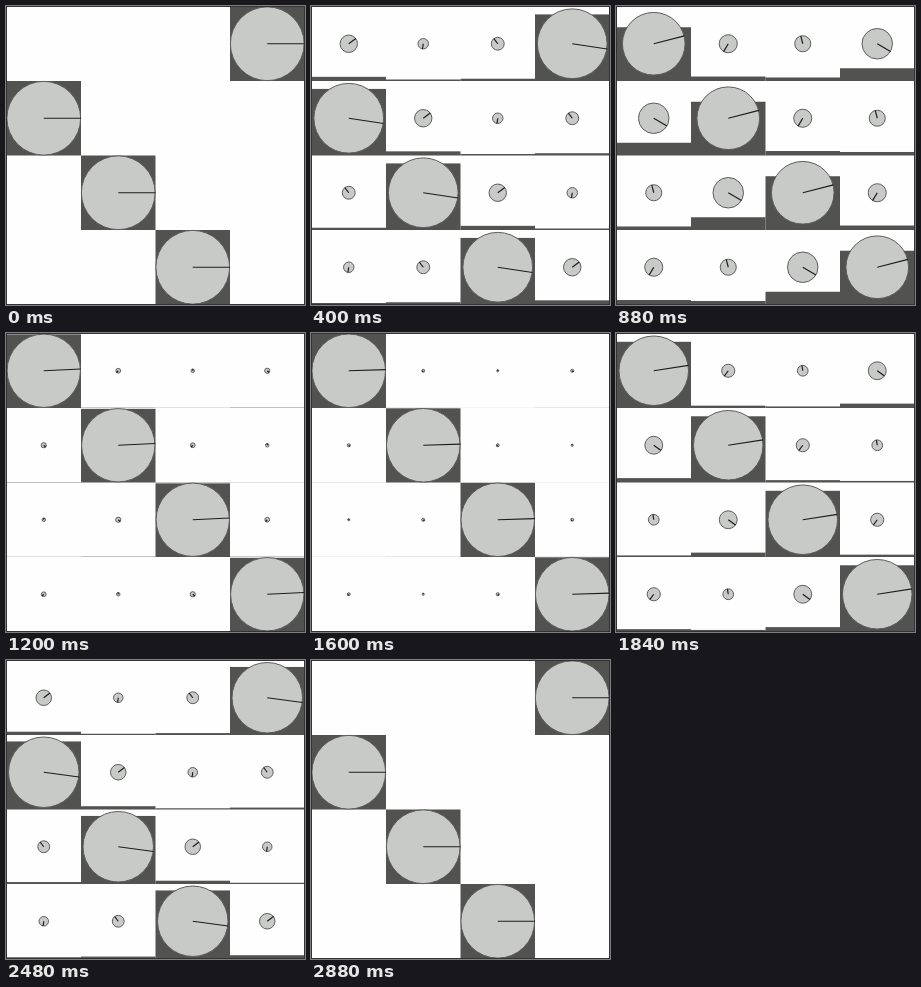
Recreate the animation shown at these times as an HTML page with a canvas. Size 299 by 299 pixels, loop 2.96 s.

```html
<!DOCTYPE html>
<html lang="en">
<head>
<meta charset="utf-8">
<title>Fractional cyclic shift</title>
<style>
  html, body { margin: 0; width: 100%; height: 100%; overflow: hidden; background: #fefefe; }
  canvas { display: block; width: 299px; height: 299px; }
</style>
</head>
<body>
<canvas id="stage" width="299" height="299"></canvas>
<script>
const ctx = document.getElementById('stage').getContext('2d');
const SIZE = 299, CELL = 74.5, EDGE = 0.5;
const STEP = 80, STEPS = 37;

// Phase of the swing in degrees at given steps, linear in between.
const SWING = [[0, 0], [8, 82.6], [11, 111.2], [15, 151.5], [23, 232.3], [28, 280.8], [36, 362]];

function swingAt(step) {
  const i = SWING.findIndex(([at]) => at >= step);
  if (i === 0) return 0;
  const [a, from] = SWING[i - 1], [b, to] = SWING[i];
  return (from + (to - from) * (step - a) / (b - a)) * Math.PI / 180;
}

// Entry of the 4x4 cyclic shift raised to power s, on diagonal k.
function amplitude(k, s) {
  const sign = k % 2 ? -1 : 1;
  return {
    re: (1 + 2 * Math.cos(Math.PI / 2 * (s - k)) + sign * Math.cos(Math.PI * s)) / 4,
    im: sign * Math.sin(Math.PI * s) / 4
  };
}

function drawCell(row, col, { re, im }) {
  const mag = Math.hypot(re, im);
  if (mag < 1e-6) return;
  const x = EDGE + col * CELL, y = EDGE + row * CELL;
  const cx = x + CELL / 2, cy = y + CELL / 2, reach = CELL / 2;

  const height = CELL * mag * mag;
  ctx.fillStyle = '#525250';
  ctx.fillRect(x, y + CELL - height, CELL, height);

  ctx.beginPath();
  ctx.arc(cx, cy, reach * mag * 0.99, 0, 2 * Math.PI);
  ctx.fillStyle = '#c8cac8';
  ctx.strokeStyle = '#5c5c5c';
  ctx.lineWidth = 1;
  ctx.fill();
  ctx.stroke();

  ctx.beginPath();
  ctx.moveTo(cx, cy);
  ctx.lineTo(cx + reach * re, cy - reach * im);
  ctx.strokeStyle = '#1c1c1c';
  ctx.lineWidth = 1.2;
  ctx.stroke();
}

function draw(step) {
  const power = (1 + Math.cos(swingAt(step))) / 2;
  const diagonals = [0, 1, 2, 3].map(k => amplitude(k, power));
  ctx.fillStyle = '#fefefe';
  ctx.fillRect(0, 0, SIZE, SIZE);
  for (let row = 0; row < 4; row++)
    for (let col = 0; col < 4; col++)
      drawCell(row, col, diagonals[(row - col + 4) % 4]);
  ctx.strokeStyle = '#333';
  ctx.lineWidth = 1;
  ctx.strokeRect(EDGE, EDGE, SIZE - 1, SIZE - 1);
}

const start = performance.now();
function tick() {
  const elapsed = Math.max(0, performance.now() - start);
  draw(Math.floor(elapsed / STEP) % STEPS);
  requestAnimationFrame(tick);
}
tick();
</script>
</body>
</html>
```
